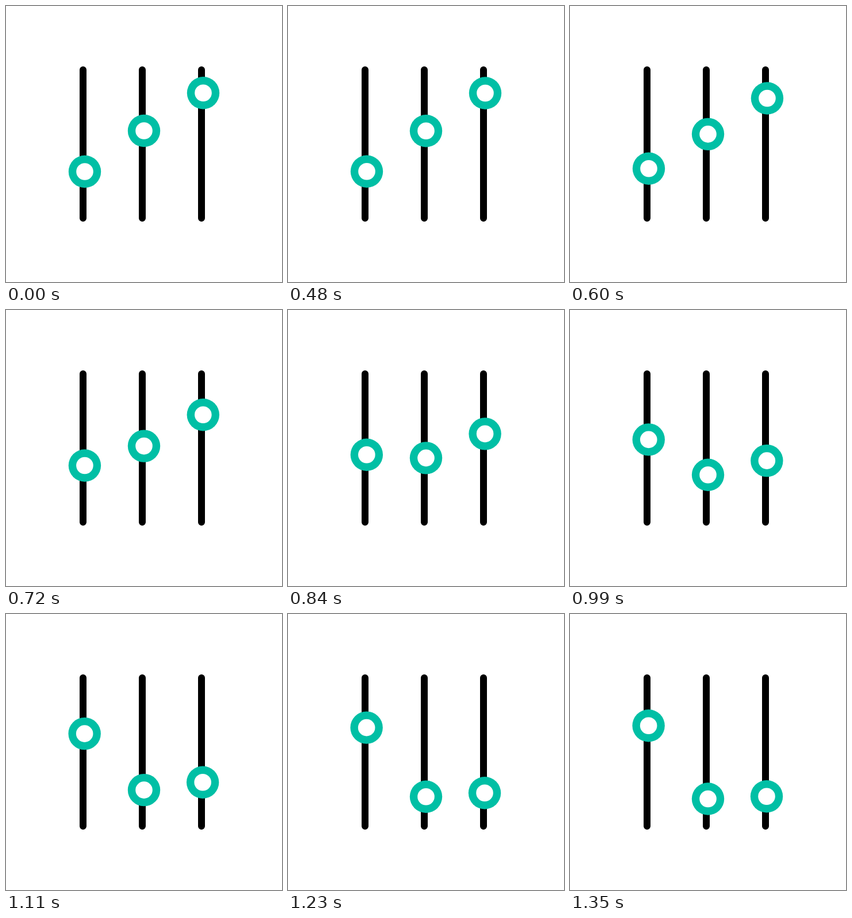
Animation, 480 px wide and 480 px high, one loop 1.83 s. Source, as an HTML page without scripts:

```html
<!DOCTYPE html>
<html lang="en">
<head>
<meta charset="utf-8">
<title>Sliders</title>
<style>
  @property --time {
    syntax: "<number>";
    inherits: true;
    initial-value: 0;
  }

  html, body {
    margin: 0;
    width: 100%;
    height: 100%;
    overflow: hidden;
    background: #fff;
  }

  svg {
    display: block;
    width: 100%;
    height: 100%;
    animation: tick 1830ms linear infinite;
  }

  /* Hold, thirty 30 ms ticks, hold */
  @keyframes tick {
    0% { --time: 0; }
    24.575% { --time: 0; animation-timing-function: steps(30, end); }
    73.755%, 100% { --time: 1; }
  }

  .track {
    stroke: #000;
    stroke-width: 12;
    stroke-linecap: round;
  }

  /* ease-in-out of the ticking time: solve the Bezier cubic, then evaluate it */
  .knob {
    --q: calc((var(--time) - 0.5) / 1.04);
    --root: sqrt(var(--q) * var(--q) + 0.173457);
    --s: calc(0.5 + pow(var(--root) + var(--q), 1 / 3) - pow(var(--root) - var(--q), 1 / 3));
    --ease: calc(var(--s) * var(--s) * (3 - 2 * var(--s)));
    transform: translate(
      calc(var(--x) + var(--dx) * var(--ease)),
      calc(var(--y) + var(--dy) * var(--ease)));
  }

  .left   { --x: 137px; --y: 288px;   --dx: -0.4px; --dy: -93.7px; }
  .middle { --x: 240px; --y: 217px;   --dx: 0px;    --dy: 104.5px; }
  .right  { --x: 343px; --y: 151.2px; --dx: -1px;   --dy: 166px; }
</style>
</head>
<body>
<svg viewBox="0 0 480 480">
  <defs>
    <g id="ring">
      <circle r="28.2" fill="#00bfa5"/>
      <circle r="14.8" fill="#fff"/>
    </g>
  </defs>
  <g class="track">
    <path d="M134 111V369M237 111V369M340 111V369"/>
  </g>
  <g class="knob left"><use href="#ring"/></g>
  <g class="knob middle"><use href="#ring"/></g>
  <g class="knob right"><use href="#ring"/></g>
</svg>
</body>
</html>
```
